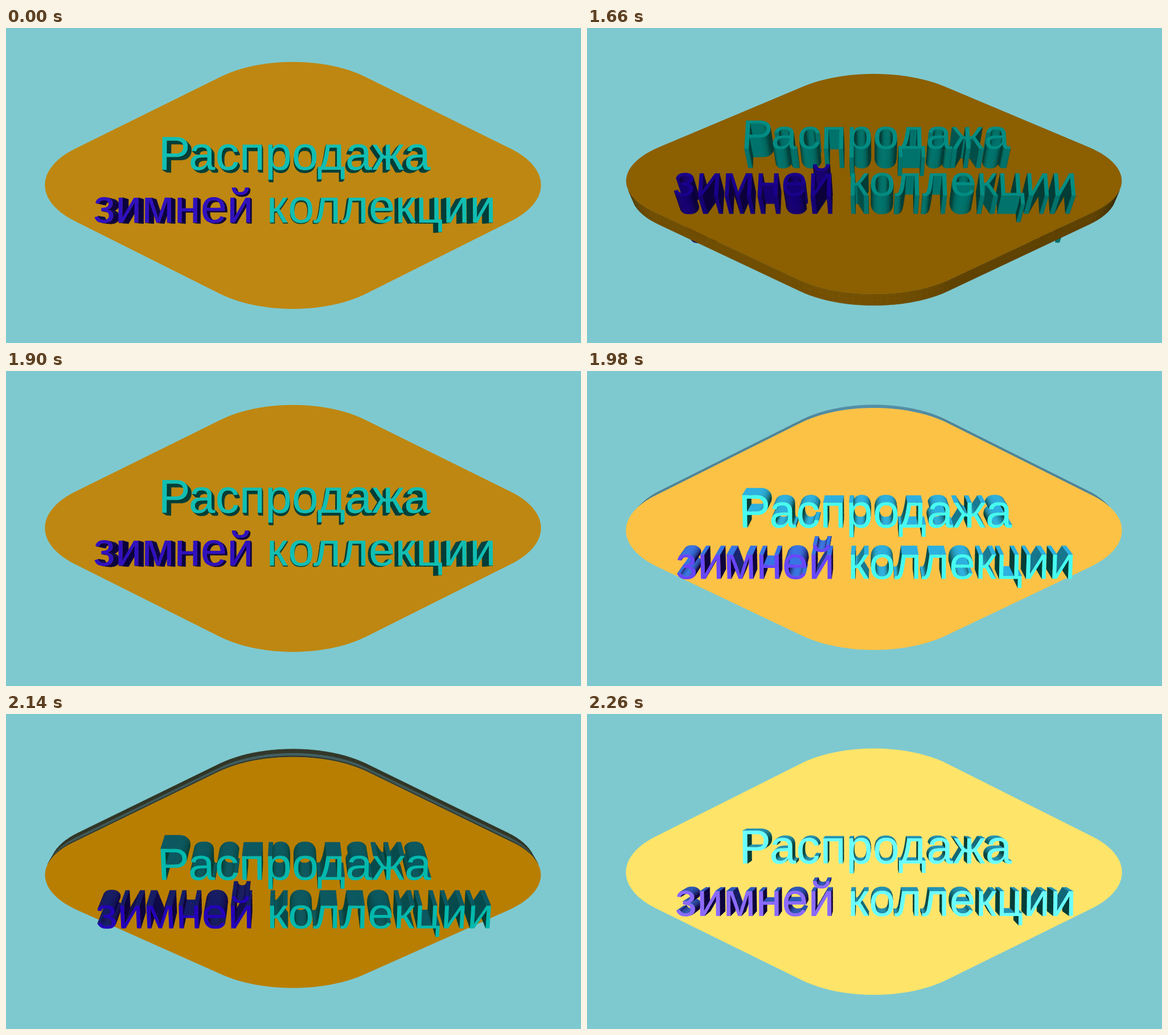
Recreate the animation shown at these times as an HTML page with a canvas. Size 1010 by 555 pixels, loop 2.3 s.

```html
<!DOCTYPE html>
<html lang="ru">
<head>
<meta charset="utf-8">
<title>Распродажа зимней коллекции</title>
<style>
  html, body { margin: 0; width: 100%; height: 100%; overflow: hidden; background: #7ec9cf; }
  canvas { display: block; }
</style>
</head>
<body>
<canvas id="stage" width="1010" height="555"></canvas>
<script>
const ctx = document.getElementById('stage').getContext('2d');
const LOOP = 2300, REST = 1500, STEP = 40;
const CX = 504, CY = 277.5, EYE = 2050;
const PLATE_Z = 26, TEXT_Z = 96;
const FONT = 'px "Liberation Sans", Arial, sans-serif';
const GOLD = [182, 124.5, 0], TEAL = [0, 182, 171], BLUE = [33, 0, 182];
const SKY = [45, 120, 175];

let deg = 0, sin = 0, cos = 1;

// Douglas-Peucker on an open run of points
function simplify(pts, tol) {
  const a = pts[0], b = pts[pts.length - 1];
  const dx = b[0] - a[0], dy = b[1] - a[1], len = Math.hypot(dx, dy) || 1;
  let far = 0, at = 0;
  for (let i = 1; i < pts.length - 1; i++) {
    const d = Math.abs((pts[i][0] - a[0]) * dy - (pts[i][1] - a[1]) * dx) / len;
    if (d > far) { far = d; at = i; }
  }
  if (far <= tol) return [a, b];
  return simplify(pts.slice(0, at + 1), tol).slice(0, -1).concat(simplify(pts.slice(at), tol));
}

function simplifyLoop(pts, tol) {
  let at = 0, far = 0;
  pts.forEach((p, i) => {
    const d = Math.hypot(p[0] - pts[0][0], p[1] - pts[0][1]);
    if (d > far) { far = d; at = i; }
  });
  return simplify(pts.slice(0, at + 1), tol).slice(0, -1)
    .concat(simplify(pts.slice(at).concat([pts[0]]), tol).slice(0, -1));
}

// Outlines of a word as closed loops (marching squares over drawn text)
function outline(word, size, x0, y0) {
  const q = 4, pad = 12;
  const cv = document.createElement('canvas');
  const font = size * q + FONT;
  const g = cv.getContext('2d');
  g.font = font;
  const w = cv.width = Math.ceil(g.measureText(word).width) + 2 * pad;
  const h = cv.height = Math.ceil(size * q * 1.3);
  const base = Math.round(size * q);
  g.font = font;
  g.fillText(word, pad, base);
  const px = g.getImageData(0, 0, w, h).data;
  const val = (x, y) => px[(y * w + x) * 4 + 3];
  const next = new Map();
  for (let y = 0; y < h - 1; y++) for (let x = 0; x < w - 1; x++) {
    const on = [val(x, y) > 127, val(x + 1, y) > 127, val(x + 1, y + 1) > 127, val(x, y + 1) > 127];
    if (on[0] === on[1] && on[1] === on[2] && on[2] === on[3]) continue;
    const i = 2 * (y * w + x), side = [i, i + 3, i + 2 * w, i + 1];
    for (let a = 0; a < 4; a++) {
      if (!on[a] || on[(a + 1) % 4]) continue;
      let b = (a + 1) % 4;
      while (!on[(b + 1) % 4]) b = (b + 1) % 4;
      next.set(side[a], side[b]);
    }
  }
  const point = id => {
    const vert = id & 1, cell = id >> 1, x = cell % w, y = (cell - x) / w;
    const va = val(x, y), vb = vert ? val(x, y + 1) : val(x + 1, y);
    const t = (127.5 - va) / (vb - va);
    return [x0 + (x + .5 + (vert ? 0 : t) - pad) / q, y0 + (y + .5 + (vert ? t : 0) - base) / q];
  };
  const loops = [];
  while (next.size) {
    const pts = [];
    let id = next.keys().next().value;
    while (next.has(id)) {
      pts.push(point(id));
      const to = next.get(id);
      next.delete(id);
      id = to;
    }
    if (pts.length > 12) loops.push(simplifyLoop(pts, .12));
  }
  return loops;
}

// Side walls of a loop, cut into short pieces so they can be sorted
function walls(loop, color, maxLen) {
  const out = [];
  loop.forEach((p, i) => {
    const n = loop[(i + 1) % loop.length];
    const dx = n[0] - p[0], dy = n[1] - p[1], len = Math.hypot(dx, dy);
    if (len < 1e-6) return;
    const parts = Math.ceil(len / maxLen);
    const at = k => [p[0] + dx * k / parts, p[1] + dy * k / parts];
    for (let k = 0; k < parts; k++) {
      const [mx, my] = at(k + .5);
      out.push({ a: at(k), b: at(k + 1), mx, my, nx: dy / len, ny: -dx / len, color });
    }
  });
  return out;
}

function rhombus(rx, ry, r) {
  const c = [[rx, 0], [0, ry], [-rx, 0], [0, -ry]], pts = [], n = 24;
  c.forEach((p, i) => {
    const u = c[(i + 3) % 4], v = c[(i + 1) % 4];
    for (let k = 0; k <= n; k++) {
      const f = k / n * Math.PI / 2, a = r * (1 - Math.sin(f)), b = r * (1 - Math.cos(f));
      pts.push([0, 1].map(j => p[j] + (u[j] - p[j]) * a + (v[j] - p[j]) * b));
    }
  });
  return pts;
}

function project(x, y, z) {
  const k = EYE / (EYE - y * sin - z * cos);
  return [CX + x * k, CY + (y * cos - z * sin) * k];
}

const rgb = c => 'rgb(' + c.map(v => Math.round(Math.max(0, Math.min(255, v)))) + ')';

function faceColor(base) {
  const d = .16 + .84 * Math.cos((deg + 17) * Math.PI / 180);
  const shine = 115 * Math.exp(-((deg + 6.73) ** 2) / 49.5);
  return rgb(base.map(v => v * d + shine));
}

function wallColor(w, peak = 10, dark = .33) {
  const lit = -.13 * w.nx + .29 * w.ny * cos + .957 * w.ny * sin;
  const shade = Math.max(dark, .05 + .84 * lit);
  const glint = Math.max(0, -w.ny) * Math.exp(-((deg + peak) ** 2) / 80);
  return rgb(w.color.map((v, i) => v * shade + SKY[i] * glint));
}

function addLoop(pts, z) {
  pts.forEach((p, i) => {
    const [x, y] = project(p[0], p[1], z);
    i ? ctx.lineTo(x, y) : ctx.moveTo(x, y);
  });
  ctx.closePath();
}

function fillLoops(loops, z, color) {
  ctx.beginPath();
  loops.forEach(l => addLoop(l, z));
  ctx.fillStyle = color;
  ctx.fill('evenodd');
}

function drawWall(w, z0, z1, color) {
  ctx.beginPath();
  [[w.a, z0], [w.b, z0], [w.b, z1], [w.a, z1]].forEach(([p, z], i) => {
    const [x, y] = project(p[0], p[1], z);
    i ? ctx.lineTo(x, y) : ctx.moveTo(x, y);
  });
  ctx.closePath();
  ctx.fillStyle = ctx.strokeStyle = color;
  ctx.fill();
  ctx.stroke();
}

const facing = w => w.ny * (EYE * sin - w.my) - w.nx * w.mx > 0;

const plate = rhombus(504, 252, .25);
const plateWalls = walls(plate, GOLD, 1000);
const BANDS = [[-PLATE_Z, 2, 10], [2, 18, 14], [18, PLATE_Z, 10]];

const SIZE1 = 80.3, SIZE2 = 79.4, LEFT1 = -225.7, LEFT2 = -333.7, LINE1 = -21.4, LINE2 = 67.3;
ctx.font = SIZE2 + FONT;
const indent = ctx.measureText('зимней ').width;
const words = [
  { loops: outline('Распродажа', SIZE1, LEFT1, LINE1), color: TEAL },
  { loops: outline('зимней', SIZE2, LEFT2, LINE2), color: BLUE },
  { loops: outline('коллекции', SIZE2, LEFT2 + indent, LINE2), color: TEAL }
];
const textWalls = words.flatMap(w => w.loops.flatMap(l => walls(l, w.color, 10)));

function draw(angle) {
  deg = angle;
  sin = Math.sin(deg * Math.PI / 180);
  cos = Math.cos(deg * Math.PI / 180);
  ctx.fillStyle = '#7ec9cf';
  ctx.fillRect(0, 0, 1010, 555);
  ctx.lineWidth = .5;
  ctx.lineJoin = 'round';

  // farthest from the eye's footprint first
  const away = w => w.mx ** 2 + (w.my - EYE * sin) ** 2;
  const seen = textWalls.filter(facing).sort((a, b) => away(b) - away(a));
  seen.forEach(w => drawWall(w, -TEXT_Z, -PLATE_Z, wallColor(w)));

  const rim = plateWalls.filter(facing);
  for (const [z0, z1, peak] of BANDS)
    rim.forEach(w => drawWall(w, z0, z1, wallColor(w, peak, .22)));
  fillLoops([plate], PLATE_Z, faceColor(GOLD));

  seen.forEach(w => drawWall(w, PLATE_Z, TEXT_Z, wallColor(w)));
  words.forEach(w => fillLoops(w.loops, TEXT_Z, faceColor(w.color)));
}

function angleAt(t) {
  const step = Math.max(0, Math.floor((t - REST) / STEP));
  return 3 + 25 * Math.sin(2 * Math.PI * step * STEP / (LOOP - REST));
}

let shown = null;
const start = performance.now();
function tick() {
  const angle = angleAt((performance.now() - start) % LOOP);
  if (angle !== shown) draw(shown = angle);
  requestAnimationFrame(tick);
}
tick();
</script>
</body>
</html>
```
